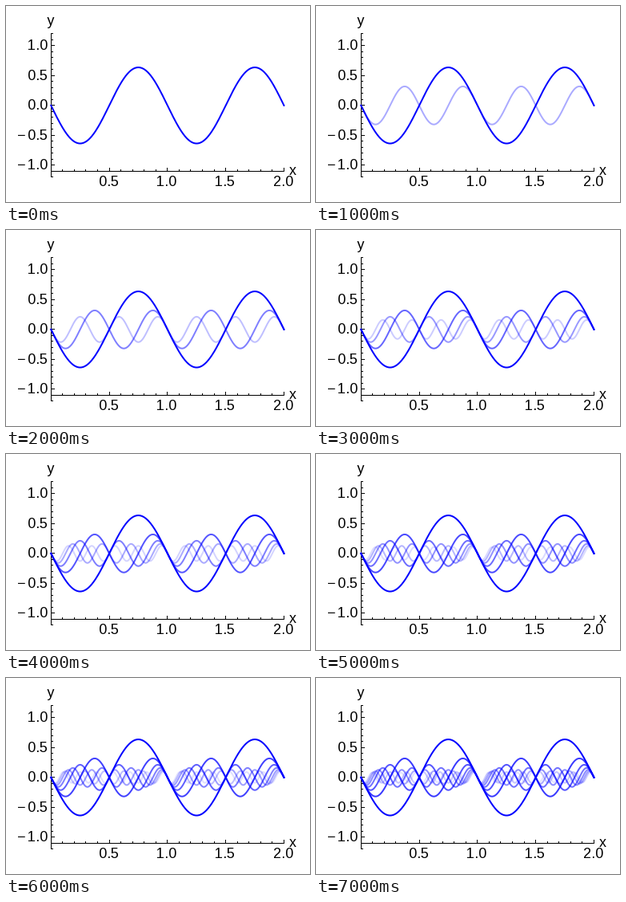
A matplotlib script that plays this animation: 380x246 px, repeating every 8000 ms.

```python
import numpy as np
import matplotlib.pyplot as plt
from matplotlib.animation import FuncAnimation

W, H, DPI = 380, 246, 100
PX = 72 / DPI                 # points per pixel
LEFT, ZERO = 56.25, 124.8     # pixel position of the origin
SX, SY = 145.6, 75.0          # pixels per unit
TERMS = 8

plt.rcParams["font.family"] = "Liberation Sans"
plt.rcParams["text.hinting_factor"] = 1
fig = plt.figure(figsize=(W / DPI, H / DPI), dpi=DPI, facecolor="white")
ax = fig.add_axes([0, 0, 1, 1])
ax.set_xlim(0, W)
ax.set_ylim(H, 0)
ax.axis("off")


def px(x):
    return LEFT + SX * x


def py(y):
    return ZERO - SY * y


def mid(v):
    """Centre of the pixel that holds v."""
    return np.floor(v) + 0.5


def rule(x0, y0, x1, y1):
    ax.plot([x0, x1], [y0, y1], color="black", lw=PX, snap=False,
            solid_capstyle="projecting", zorder=1)


def label(x, y, text, ha="center"):
    ax.text(x, y, text, ha=ha, va="baseline", fontsize=18 * PX, color="black")


def draw_axes():
    left, right = mid(px(0)), mid(px(2))
    top, base, bottom = mid(py(1.2)), mid(py(-1.1)), mid(py(-1.2))
    rule(left, top, left, bottom)
    rule(left, base, right, base)
    for i in range(21):
        x, major = px(i / 10), i % 5 == 0
        rule(mid(x), base, mid(x), base - (4 if major else 2))
        if i and major:
            label(x - 1, 226, f"{i / 10:.1f}")
    for i in range(-12, 13):
        y, major = py(i / 10), i % 5 == 0
        rule(left, mid(y), left + (4 if major else 2), mid(y))
        if major:
            label(52, y + 5.6, f"{abs(i) / 10:.1f}", ha="right")
            if i < 0:
                label(14, y + 5.6, "\u2212", ha="left")
    label(55.5, 23.5, "y")
    label(358, 212, "x")


draw_axes()

x = np.linspace(0, 2, 1200)
waves = []
for k in range(1, TERMS + 1):
    y = -2 / (np.pi * k) * np.sin(2 * np.pi * k * x)
    line, = ax.plot(px(x), py(y), color="blue", lw=2 * PX,
                    solid_capstyle="projecting", zorder=20 - k)
    waves.append(line)


def update(frame):
    """Show one more harmonic per step; higher ones are fainter."""
    n = frame + 1
    for k, line in enumerate(waves, 1):
        line.set_visible(k <= n)
        line.set_alpha(1 if k == 1 else max(0, n + 1 - k) / (n + 1))
    return waves


anim = FuncAnimation(fig, update, frames=TERMS, interval=1000,
                     init_func=lambda: update(0), repeat=True, repeat_delay=0)
plt.show()
```
